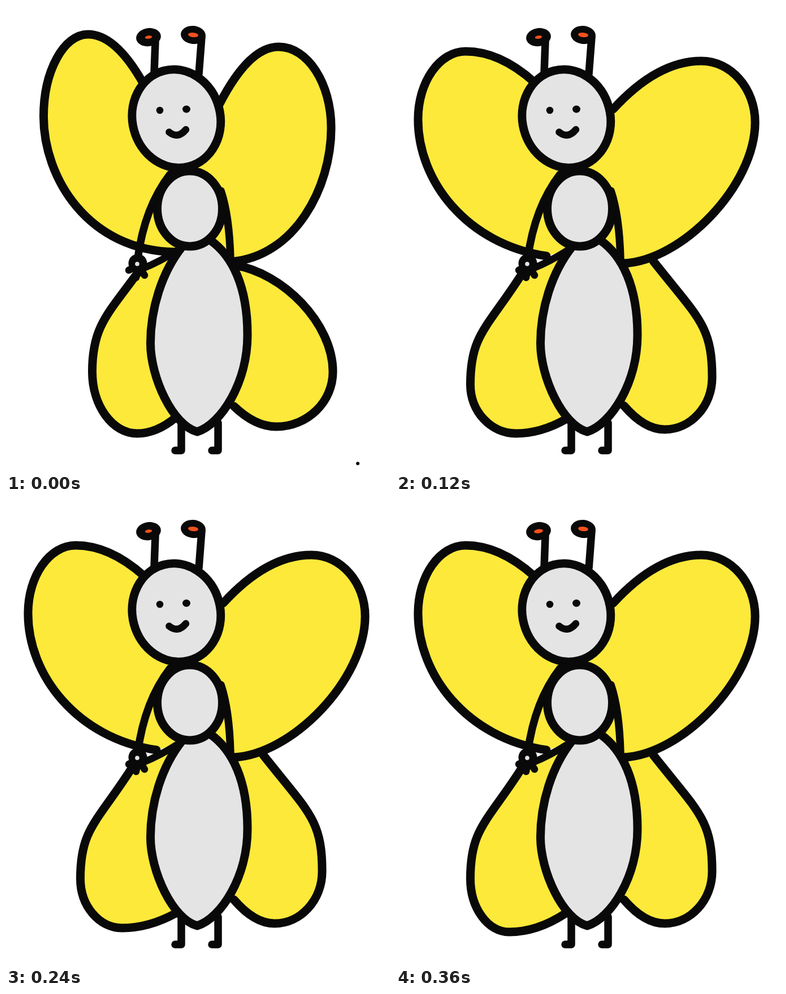
An HTML page with a canvas for the animation above (420 ms loop, 679 by 822 pixels).

```html
<!DOCTYPE html>
<html lang="en">
<head>
<meta charset="utf-8">
<title>Fluttering butterfly</title>
<style>
  html, body { margin: 0; width: 100%; height: 100%; overflow: hidden; background: #fff; }
  canvas { display: block; }
</style>
</head>
<body>
<canvas id="stage" width="679" height="822"></canvas>
<script>
const ctx = document.getElementById('stage').getContext('2d');
const INK = '#090909', YELLOW = '#fde93a', GREY = '#e4e4e4', ORANGE = '#f4511e';
const STEP = 60, OUTLINE = 15;

function stroke(d, width = OUTLINE) {
  ctx.lineWidth = width;
  ctx.stroke(new Path2D(d));
}

function fill(d, colour) {
  ctx.fillStyle = colour;
  ctx.fill(new Path2D(d));
}

function oval(x, y, rx, ry, tilt, colour, outline) {
  ctx.beginPath();
  ctx.ellipse(x, y, rx, ry, tilt, 0, 2 * Math.PI);
  ctx.fillStyle = colour;
  ctx.fill();
  if (outline) {
    ctx.lineWidth = outline;
    ctx.stroke();
  }
}

// A wing leaves its root, rounds the cap (level there) as a quarter oval
// to the side (upright there), then heads past aim to the tip.
function wing(root, [cx, cy], [sx, sy], aim, tip) {
  const level = [cx + (sx - cx) * .55, cy], upright = [sx, sy + (cy - sy) * .55];
  const leave = [sx, sy + (tip[1] - sy) * .45];
  return `M${root} Q${(root[0] + cx) / 2},${cy} ${cx},${cy} C${level} ${upright} ${sx},${sy} C${leave} ${aim} ${tip}`;
}

const raised = [
  wing([243, 137], [145, 50], [66.5, 195], [145, 432], [300, 434]),
  wing([378, 172], [482, 72], [575, 215], [510, 441], [400, 451]),
  wing([403, 706], [478, 742], [578, 645], [490, 470], [403, 457]),
  wing([300, 726], [232, 754], [152.5, 645], [178, 545], [232, 472])
];
// The lower left wing trembles: only its cap shifts between beats.
const spread = cap => [
  wing([243, 133], [123, 80], [39, 200], [125, 420], [266, 441]),
  wing([384, 182], [540, 97], [635, 205], [505, 450], [402, 454]),
  wing([403, 705], [475, 747], [559, 655], [534, 550], [455, 450]),
  wing([300, 729], cap, [131.5, 668], [160, 570], [223, 472])
];

// Each feeler knob: [tilt, size of its orange core].
const flat = [[-.15, .7], [.1, 1]];
const tilted = [[.85, 1.1], [.4, .95]];
const narrow = [[.85, .7], [.75, .65]];
const bright = [[-.15, .9], [.1, 1]];

const poses = [
  { wings: raised, knobs: flat, speck: true },
  { wings: spread([218, 758]), knobs: tilted },
  { wings: spread([212, 754]), knobs: flat },
  { wings: raised, knobs: narrow },
  { wings: spread([205, 755]), knobs: flat },
  { wings: raised, knobs: flat },
  { wings: spread([200, 762]), knobs: bright }
];

function drawWings(wings) {
  wings.forEach(d => fill(d + 'L320,425 L318,290', YELLOW));
  wings.forEach(d => stroke(d));
  stroke('M305,430 Q272,451 242,463', 12.5);
}

function drawBody() {
  const belly = 'M312,424 C275,470 255.5,535 255.5,595 S295,740 338,751 C380,738 427,665 427,580 S400,440 361,413';
  for (const x of [310, 375]) stroke(`M${x},735 V784 h-11`, 13.5);
  fill(belly, GREY);
  stroke(belly);
  stroke('M290,297 Q245,355 233,445', 13.5);
  stroke('M380,326 Q395,370 397,447', 13.5);
  oval(325, 357.5, 57.5, 66.5, 0, GREY, OUTLINE);
}

function drawHand() {
  oval(233, 454, 16.5, 16.5, 0, INK);
  stroke('M217,466 L234,458 L230,479 M234,458 L245,475', 12.5);
  oval(232, 455, 3.8, 3.8, 0, GREY);
}

function drawKnob(x, y, [tilt, core]) {
  oval(x, y, 22, 16, tilt, INK);
  oval(x, y, 9 * core, 4 * core, tilt, ORANGE);
}

function drawHead([left, right]) {
  stroke('M264.5,50 L262,118', 13.5);
  stroke('M346,55 L341,120', 13.5);
  drawKnob(252, 55, left);
  drawKnob(331, 51, right);
  oval(301.3, 198.7, 77.7, 87.3, -.26, GREY, OUTLINE);
  oval(272, 184, 6.3, 6.3, 0, INK);
  oval(319, 182, 7, 6.5, 0, INK);
  stroke('M288.5,222.5 Q304,235 318,218', 12.5);
}

function draw({ wings, knobs, speck }) {
  ctx.fillStyle = '#fff';
  ctx.fillRect(0, 0, 679, 822);
  ctx.strokeStyle = INK;
  ctx.lineCap = ctx.lineJoin = 'round';
  drawWings(wings);
  drawBody();
  drawHand();
  drawHead(knobs);
  if (speck) oval(622, 807, 3, 3, 0, INK);
}

const start = performance.now();
function tick() {
  const elapsed = Math.max(0, performance.now() - start);
  draw(poses[Math.floor(elapsed / STEP) % poses.length]);
  requestAnimationFrame(tick);
}
tick();
</script>
</body>
</html>
```
